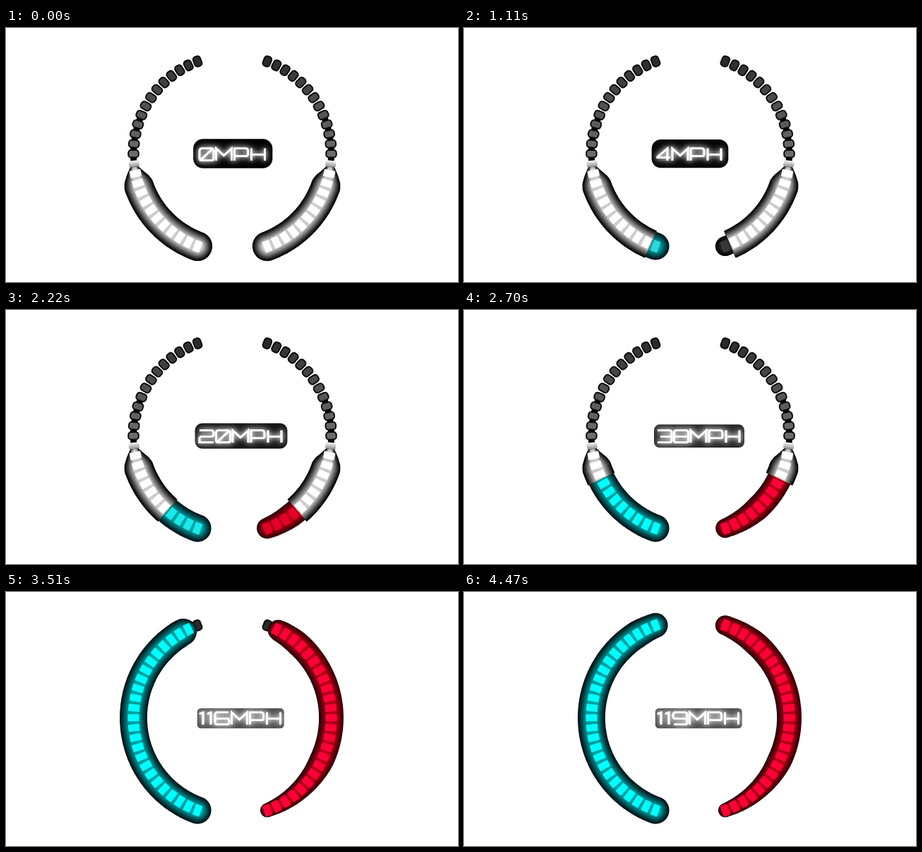
Write an HTML page with a canvas that moves like this. It is 640 px wide and 360 px high and loops after 4500 ms.

```html
<!DOCTYPE html>
<html lang="en">
<head>
<meta charset="utf-8">
<title>Speedometer</title>
<style>
  html, body { margin: 0; width: 100%; height: 100%; overflow: hidden; background: #fff; }
  canvas { display: block; }
</style>
</head>
<body>
<canvas id="stage" width="640" height="360"></canvas>
<script>
const ctx = document.getElementById('stage').getContext('2d');
const LOOP = 4500, TICK = 30, TOP_SPEED = 119;
const COUNT = 25, STEP = 5.78 * Math.PI / 180;
const LAST_WHITE = 11;
const CX = 320.5, CY = 178.3, RADIUS = 140;

const WHITE = { edge: [0, 0, 0], core: [205, 205, 205] };
const CYAN = { edge: [0, 18, 22], core: [0, 160, 162], dim: [50, 210, 212], fill: [0, 255, 255] };
const RED = { edge: [48, 0, 7], core: [180, 0, 22], dim: [200, 0, 24], fill: [255, 0, 56] };
const DARK = { edge: [0, 0, 0], core: [45, 45, 45] };

// Each glyph: advance width and stroke path in a box 17 high.
const BOX = 'M3 0H17Q20 0 20 3V14Q20 17 17 17H3Q0 17 0 14V3Q0 0 3 0Z';
const GLYPHS = {
  0: [23.5, BOX + 'M2 16L18 1'],
  1: [11, 'M0 2L5 0V17'],
  2: [23.5, 'M0 0H17Q20 0 20 3V5.5Q20 8.5 17 8.5H3Q0 8.5 0 11.5V17H20'],
  3: [23.5, 'M0 0H17Q20 0 20 3V14Q20 17 17 17H0M4 8.5H20'],
  4: [21, 'M14 17V0L0 12V13H18'],
  5: [23.5, 'M20 0H0V5.5Q0 8.5 3 8.5H17Q20 8.5 20 11.5V14Q20 17 17 17H0'],
  6: [23.5, 'M19 0H3Q0 0 0 3V14Q0 17 3 17H17Q20 17 20 14V11.5Q20 8.5 17 8.5H0'],
  7: [18, 'M0 0H10Q13 0 13 3V17'],
  8: [23.5, BOX + 'M0 8.5H20'],
  9: [23.5, 'M20 8.5H3Q0 8.5 0 5.5V3Q0 0 3 0H17Q20 0 20 3V14Q20 17 17 17H1'],
  M: [26, 'M0 17V0L11 10L22 0V17'],
  P: [24, 'M0 17V0H16Q19 0 19 3V8Q19 11 16 11H0'],
  H: [19, 'M0 0V17M19 0V17M0 8.5H19']
};
for (const key in GLYPHS) GLYPHS[key][1] = new Path2D(GLYPHS[key][1]);

const gray = v => `rgb(${v},${v},${v})`;
const angleAt = i => (i - 12) * STEP;

function mix(a, b, f) {
  return `rgb(${a.map((v, k) => Math.round(v + (b[k] - v) * f))})`;
}

// Glow made of nested discs along the arc, dark at the rim.
function halo(from, to, radiusAt, { edge, core }) {
  const shells = 18;
  for (let k = 0; k < shells; k++) {
    const depth = k / shells;
    ctx.fillStyle = mix(edge, core, Math.min(1, depth / 0.62) ** 1.1);
    ctx.beginPath();
    for (let i = from; i <= to + 0.001; i += 0.2) {
      const a = angleAt(i), r = radiusAt(i) * (1 - depth);
      const x = CX - RADIUS * Math.cos(a), y = CY - RADIUS * Math.sin(a);
      ctx.moveTo(x + r, y);
      ctx.arc(x, y, r, 0, Math.PI * 2);
    }
    ctx.fill();
  }
}

// Runs paint limited to the sector between two segment positions.
function inSector(from, to, paint) {
  ctx.save();
  ctx.beginPath();
  ctx.moveTo(CX, CY);
  ctx.arc(CX, CY, RADIUS + 50, Math.PI + angleAt(from), Math.PI + angleAt(to));
  ctx.closePath();
  ctx.clip();
  paint();
  ctx.restore();
}

function segment(i, fill, w = 16, h = 10, corner = 1, outline) {
  ctx.save();
  ctx.translate(CX, CY);
  ctx.rotate(angleAt(i));
  ctx.beginPath();
  ctx.roundRect(-RADIUS - w / 2, -h / 2, w, h, corner);
  ctx.fillStyle = fill;
  ctx.fill();
  if (outline) {
    ctx.strokeStyle = outline;
    ctx.stroke();
  }
  ctx.restore();
}

function unlitSegments(passed) {
  const linkStart = Math.max(10, passed);
  if (linkStart < 16) {
    ctx.strokeStyle = '#000';
    ctx.lineWidth = 9;
    ctx.beginPath();
    ctx.arc(CX, CY, RADIUS, Math.PI + angleAt(linkStart), Math.PI + angleAt(16));
    ctx.stroke();
  }
  ctx.lineWidth = 2;
  for (let i = Math.max(LAST_WHITE + 1, passed); i < COUNT; i++) {
    segment(i, gray(Math.round(108 - (i - 12) * 5.5)), 14.5, 10.5, 4, '#0c0c0c');
  }
}

function whiteSegments(first) {
  if (first > LAST_WHITE) return;
  inSector(first ? first - 0.5 : -4, 12, () =>
    halo(Math.max(0, first - 1), 10.4, i => Math.min(21, 10.5 + (10 - i) * 8), WHITE));
  const fade = ctx.createLinearGradient(0, -5, 0, 5);
  fade.addColorStop(0, '#fff');
  fade.addColorStop(1, '#8a8a8a');
  for (let i = first; i < LAST_WHITE; i++) segment(i, '#fff');
  segment(LAST_WHITE, fade, 15, 9, 2);
}

function litSegments(count, radiusAt, style) {
  if (!count) return;
  const last = count - 1;
  if (last < LAST_WHITE) {
    inSector(-4, last + 0.5, () => halo(0, count, radiusAt, style));
  } else {
    const front = i => count === COUNT ? Infinity : 12 + (last - i) * 13;
    halo(0, last, i => Math.min(radiusAt(i), front(i)), style);
  }
  const fill = mix(style.dim, style.fill, Math.min(1, count / 8));
  for (let i = 0; i < count; i++) segment(i, fill);
}

function gauge(passed, lit, radiusAt, style) {
  unlitSegments(passed);
  whiteSegments(passed);
  if (passed > lit) {
    inSector(-4, 0.5, () => halo(0, 1, () => 14, DARK));
    segment(0, '#383838');
  }
  litSegments(lit, radiusAt, style);
}

function strokeText(chars, left, top) {
  let x = left;
  for (const c of chars) {
    const [advance, path] = GLYPHS[c];
    ctx.save();
    ctx.translate(x, top);
    ctx.stroke(path);
    ctx.restore();
    x += advance;
  }
}

function readout(speed) {
  const chars = [...(Math.floor(speed) + 'MPH')];
  const left = 274, top = 170.8;
  const width = chars.reduce((sum, c) => sum + GLYPHS[c][0], 0);
  const calm = Math.exp(-speed / 35);
  const padX = 2 + 6 * calm;
  const blobTop = 165 - 8 * calm, blobBottom = 193 + 6 * calm;

  ctx.save();
  ctx.beginPath();
  ctx.roundRect(left - 1 - padX, blobTop, width + 4 + 2 * padX, blobBottom - blobTop, 5 + 9 * calm);
  ctx.fillStyle = gray(Math.round(Math.min(75, speed)));
  ctx.fill();
  ctx.clip();
  ctx.strokeStyle = ctx.shadowColor = '#fff';
  ctx.lineWidth = 2.6;
  ctx.shadowBlur = 12;
  strokeText(chars, left, top);
  ctx.shadowBlur = 6;
  strokeText(chars, left, top);
  ctx.restore();

  ctx.strokeStyle = '#fff';
  ctx.lineWidth = 2.6;
  strokeText(chars, left, top);
}

function draw(time) {
  const speed = Math.min(TOP_SPEED, 0.975 * Math.exp(time / 734));
  const level = speed / TOP_SPEED * COUNT;
  const passed = Math.round(level);
  const redCount = level < 0.95 ? 0 : passed;
  const redTip = Math.max(10, 16 - passed * 0.3);

  ctx.fillStyle = '#fff';
  ctx.fillRect(0, 0, 640, 360);
  gauge(passed, passed, i => 19.5 - Math.max(0, i - 22), CYAN);

  ctx.save();
  ctx.translate(641, 0);
  ctx.scale(-1, 1);
  gauge(passed, redCount,
    i => Math.min(17.5, redTip + i, 14 + COUNT - 1 - Math.min(i, COUNT - 1)), RED);
  ctx.restore();

  readout(speed);
}

const start = performance.now();
function frame() {
  const time = (performance.now() - start) % LOOP;
  draw(Math.floor(time / TICK) * TICK);
  requestAnimationFrame(frame);
}
frame();
</script>
</body>
</html>
```
